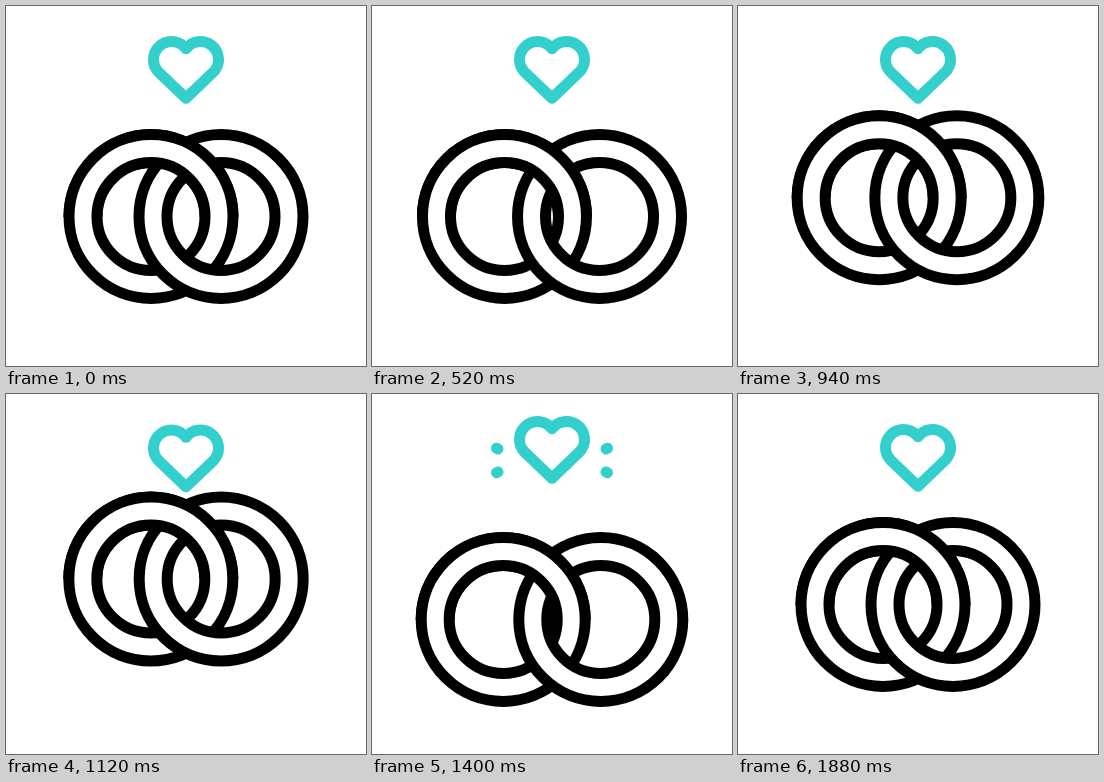
These frames come from a looping animation (360x360 px, 2.48 s). An HTML page with a canvas:

```html
<!DOCTYPE html>
<html lang="en">
<head>
<meta charset="utf-8">
<title>Rings and heart</title>
<style>
html, body { margin: 0; height: 100%; overflow: hidden; background: #fff; }
canvas { display: block; width: 360px; height: 360px; }
</style>
</head>
<body>
<canvas id="stage"></canvas>
<script>
const LOOP = 2480, TEAL = '#32cfcc', LINE = 11;
const canvas = document.getElementById('stage');
const ctx = canvas.getContext('2d');
const ratio = window.devicePixelRatio || 1;
canvas.width = canvas.height = 360 * ratio;

// Keyframes are [time, value] pairs, eased in and out between neighbours.
const spread = [[0, 35], [640, 48.8], [1100, 35], [1400, 48.8], [1880, 35]];
const ringY = [[640, 210.5], [1100, 184.5], [1400, 225.5], [1880, 210.5]];
const heartY = [[1100, 0], [1260, 13], [1400, -8], [1560, 0]];
const sparkHead = [[1380, 0], [1500, 1]];
const sparkTail = [[1440, 0], [1620, 1]];

function at(keys, t) {
  if (t <= keys[0][0]) return keys[0][1];
  for (let i = 1; i < keys.length; i++) {
    const [t0, a] = keys[i - 1], [t1, b] = keys[i];
    if (t < t1) {
      const u = (t - t0) / (t1 - t0);
      return a + (b - a) * u * u * (3 - 2 * u);
    }
  }
  return keys[keys.length - 1][1];
}

function ring(x, y) {
  for (const [color, width] of [['#000', 39], ['#fff', 17]]) {
    ctx.beginPath();
    ctx.arc(x, y, 68, 0, 2 * Math.PI);
    ctx.strokeStyle = color;
    ctx.lineWidth = width;
    ctx.stroke();
  }
}

function rings(t) {
  const dx = at(spread, t), y = at(ringY, t);
  ring(180 - dx, y);
  ring(180 + dx, y);
  // The left ring passes over the right one at the upper crossing only.
  ctx.save();
  ctx.beginPath();
  ctx.rect(0, 0, 360, Math.round(y));
  ctx.clip();
  ring(180 - dx, y);
  ctx.restore();
}

function heart(dy) {
  const notch = 0.636;
  ctx.beginPath();
  ctx.moveTo(180, 92.3 + dy);
  ctx.arc(165.5, 53.5 + dy, 18, Math.PI * 0.75, -notch);
  ctx.arc(194.5, 53.5 + dy, 18, Math.PI + notch, Math.PI * 2.25);
  ctx.closePath();
  ctx.stroke();
}

function sparks(t) {
  const head = at(sparkHead, t), tail = at(sparkTail, t);
  if (head <= tail) return;
  for (const sx of [-1, 1]) for (const sy of [-1, 1]) {
    const point = u => [180 + sx * (54 + 20 * u), 66.5 + sy * (11.5 + 9.5 * u)];
    ctx.beginPath();
    ctx.moveTo(...point(tail));
    ctx.lineTo(...point(head));
    ctx.stroke();
  }
}

function draw(now) {
  const t = now % LOOP;
  ctx.setTransform(ratio, 0, 0, ratio, 0, 0);
  ctx.fillStyle = '#fff';
  ctx.fillRect(0, 0, 360, 360);
  rings(t);
  ctx.strokeStyle = TEAL;
  ctx.lineWidth = LINE;
  ctx.lineCap = ctx.lineJoin = 'round';
  heart(at(heartY, t));
  sparks(t);
  requestAnimationFrame(frame);
}

let start;
function frame(now) {
  start ??= now;
  draw(now - start);
}
requestAnimationFrame(frame);
</script>
</body>
</html>
```
